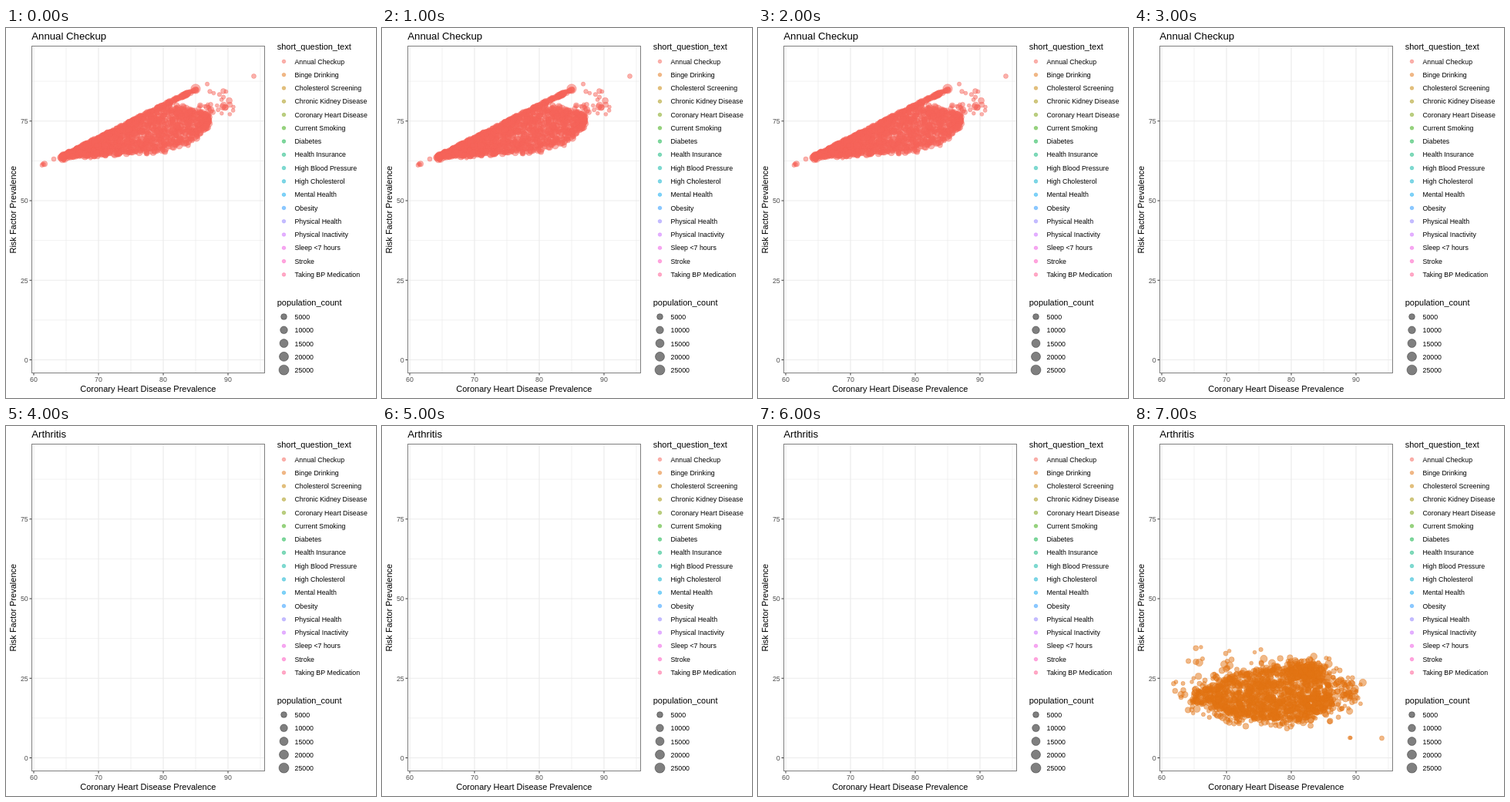
Write an HTML page with a canvas that moves like this. It is 480 px wide and 480 px high and loops after 8000 ms.

```html
<!DOCTYPE html>
<html lang="en">
<head>
<meta charset="utf-8">
<title>Risk factor scatter</title>
<style>
  html, body { margin: 0; width: 100%; height: 100%; overflow: hidden; background: #fff; }
  canvas { display: block; width: 480px; height: 480px; }
</style>
</head>
<body>
<canvas id="stage" width="480" height="480"></canvas>
<script>
const ctx = document.getElementById('stage').getContext('2d');
const LOOP = 8000;
const FONT = '"Liberation Sans", Arial, sans-serif';
const ROW = 17.28;

const factors = ['Annual Checkup', 'Binge Drinking', 'Cholesterol Screening',
  'Chronic Kidney Disease', 'Coronary Heart Disease', 'Current Smoking', 'Diabetes',
  'Health Insurance', 'High Blood Pressure', 'High Cholesterol', 'Mental Health', 'Obesity',
  'Physical Health', 'Physical Inactivity', 'Sleep <7 hours', 'Stroke', 'Taking BP Medication'];

const px = v => 36 + (v - 60) * 8.4;
const py = v => 430.5 - v * 4.13;

// Evenly spaced hues in polar CIELUV (chroma 100, lightness 65), slightly darkened
function hue(i) {
  const h = (15 + i * 360 / factors.length) * Math.PI / 180;
  const L = 65, C = 100;
  const Y = ((L + 16) / 116) ** 3;
  const u = C * Math.cos(h) / (13 * L) + 0.1978;
  const v = C * Math.sin(h) / (13 * L) + 0.4683;
  const X = 9 * Y * u / (4 * v);
  const Z = 3 * Y / v - X / 3 - 5 * Y;
  const rgb = [
    3.2405 * X - 1.5372 * Y - 0.4985 * Z,
    -0.9693 * X + 1.876 * Y + 0.0416 * Z,
    0.0556 * X - 0.204 * Y + 1.0573 * Z
  ].map(c => {
    const s = 1.055 * Math.max(c, 0.0031) ** (1 / 2.4) - 0.055;
    return Math.round(255 * Math.min(1, Math.max(0, s)) ** 1.22);
  });
  return `rgb(${rgb})`;
}

function seeded(seed) {
  return () => {
    seed = (seed + 0x6d2b79f5) | 0;
    let t = Math.imul(seed ^ (seed >>> 15), 1 | seed);
    t = (t + Math.imul(t ^ (t >>> 7), 61 | t)) ^ t;
    return ((t ^ (t >>> 14)) >>> 0) / 4294967296;
  };
}

// A cloud collects points [x, y, radius] from placing rules
function cloud(seed) {
  const rnd = seeded(seed);
  const points = [];
  const scatter = (count, place) => {
    for (let i = 0; i < count; i++) points.push([...place(), 2.4 + 2.4 * rnd() ** 1.7]);
  };
  const box = (count, x, y, w, h) => scatter(count, () => [x + w * rnd(), y + h * rnd()]);
  return { rnd, points, scatter, box };
}

function checkupCloud() {
  const { rnd, points, scatter, box } = cloud(17);
  const ridge = x => 78 + (248 - x) / 2;
  scatter(300, () => {
    const x = 70 + 177 * rnd();
    return [x, ridge(x) + 1.5 * rnd()];
  });
  scatter(1500, () => {
    const u = rnd();
    const x = 72 + 192 * u;
    const top = ridge(x) + 1 + 0.8 * Math.max(0, x - 212);
    const bottom = 166 - 8 * u - 36 * u ** 8;
    return [x, top + (bottom - top) * rnd() ** 1.1 + 5 * rnd() ** 5];
  });
  scatter(30, () => [250 + 47 * rnd() ** 1.3, 98 + 16 * rnd()]);
  box(9, 254, 70, 40, 25);
  box(4, 46, 176, 4, 2);
  points.push([62, 170, 3], [141, 164, 4.6], [246, 79, 6.2], [321.5, 62.5, 3]);
  return points;
}

function drinkingCloud() {
  const { rnd, points, scatter, box } = cloud(52);
  const ellipse = (count, inner, outer) => scatter(count, () => {
    const a = 2 * Math.PI * rnd();
    const r = Math.sqrt(inner ** 2 + (outer ** 2 - inner ** 2) * rnd());
    const dy = r * Math.sin(a);
    return [180 + 96 * r * Math.cos(a), 352 + dy * (dy < 0 ? 44 : 33)];
  });
  ellipse(1150, 0, 0.85);
  ellipse(260, 0.75, 1.06);
  ellipse(70, 1.02, 1.25);
  scatter(150, () => [194 + 62 * (rnd() + rnd()) / 2, 298 + 38 * (rnd() + rnd()) / 2]);
  box(60, 74, 341, 40, 18);
  box(14, 265, 332, 32, 20);
  box(5, 46, 332, 18, 12);
  box(12, 66, 281, 100, 32);
  points.push([280, 404.5, 2.5], [281, 404.5, 2.3], [321.5, 405, 3]);
  return points;
}

function dots(points, color) {
  ctx.save();
  ctx.globalAlpha = 0.5;
  ctx.fillStyle = ctx.strokeStyle = color;
  ctx.lineWidth = 0.7;
  for (const [x, y, r] of points) {
    ctx.beginPath();
    ctx.arc(x, y, r, 0, 2 * Math.PI);
    ctx.fill();
    ctx.stroke();
  }
  ctx.restore();
}

function text(str, x, y, size, align = 'left', color = '#000') {
  ctx.font = `${size}px ${FONT}`;
  ctx.textAlign = align;
  ctx.fillStyle = color;
  ctx.fillText(str, x, y);
}

function line(x1, y1, x2, y2, color, width) {
  ctx.strokeStyle = color;
  ctx.lineWidth = width;
  ctx.beginPath();
  ctx.moveTo(x1, y1);
  ctx.lineTo(x2, y2);
  ctx.stroke();
}

function grid(offset, width) {
  for (let i = 0; i < 4; i++) {
    const x = px(60 + 10 * (i + offset));
    const y = py(25 * (i + offset));
    line(x, 23.5, x, 447.5, '#ebebeb', width);
    line(33.5, y, 335.5, y, '#ebebeb', width);
  }
}

function axes() {
  ctx.strokeStyle = '#7f7f7f';
  ctx.lineWidth = 1;
  ctx.strokeRect(33.5, 23.5, 302, 424);
  for (let i = 0; i < 4; i++) {
    const x = px(60 + 10 * i);
    const y = py(25 * i);
    line(x, 448, x, 450.5, '#333', 1);
    text(60 + 10 * i, x, 459, 8.8, 'center', '#4d4d4d');
    line(30.5, y, 33, y, '#333', 1);
    text(25 * i, 28.7, y + 3.3, 8.8, 'right', '#4d4d4d');
  }
  text('Coronary Heart Disease Prevalence', 184.3, 472, 11, 'center');
  ctx.save();
  ctx.translate(13, 235.7);
  ctx.rotate(-Math.PI / 2);
  text('Risk Factor Prevalence', 0, 0, 11, 'center');
  ctx.restore();
}

function legends() {
  text('short_question_text', 351.7, 28, 11);
  factors.forEach((name, i) => {
    const y = 43.4 + i * ROW;
    dots([[360.5, y, 2.3]], hue(i));
    text(name, 374.5, y + 3.13, 8.8);
  });
  text('population_count', 351.7, 360, 11);
  for (let i = 0; i < 5; i++) {
    const y = 374.5 + i * ROW;
    dots([[360.5, y, 2.4 + 1.9 * Math.sqrt(i + 0.6)]], '#000');
    text((i + 1) * 5000, 374.5, y + 3.5, 8.8);
  }
}

function draw(scene) {
  ctx.fillStyle = '#fff';
  ctx.fillRect(0, 0, 480, 480);
  grid(0.5, 0.7);
  grid(0, 1.2);
  if (scene.points) dots(scene.points, scene.color);
  axes();
  legends();
  text(scene.title, 33.3, 15, 13.2);
}

const scenes = [
  { until: 3000, title: 'Annual Checkup', points: checkupCloud(), color: hue(0) },
  { until: 4000, title: 'Annual Checkup' },
  { until: 7000, title: 'Arthritis' },
  { until: LOOP, title: 'Arthritis', points: drinkingCloud(), color: hue(1) }
];

let shown = null;
const start = performance.now();
function tick() {
  const t = (performance.now() - start) % LOOP;
  const scene = scenes.find(s => t < s.until);
  if (scene !== shown) draw(shown = scene);
  requestAnimationFrame(tick);
}
tick();
</script>
</body>
</html>
```
